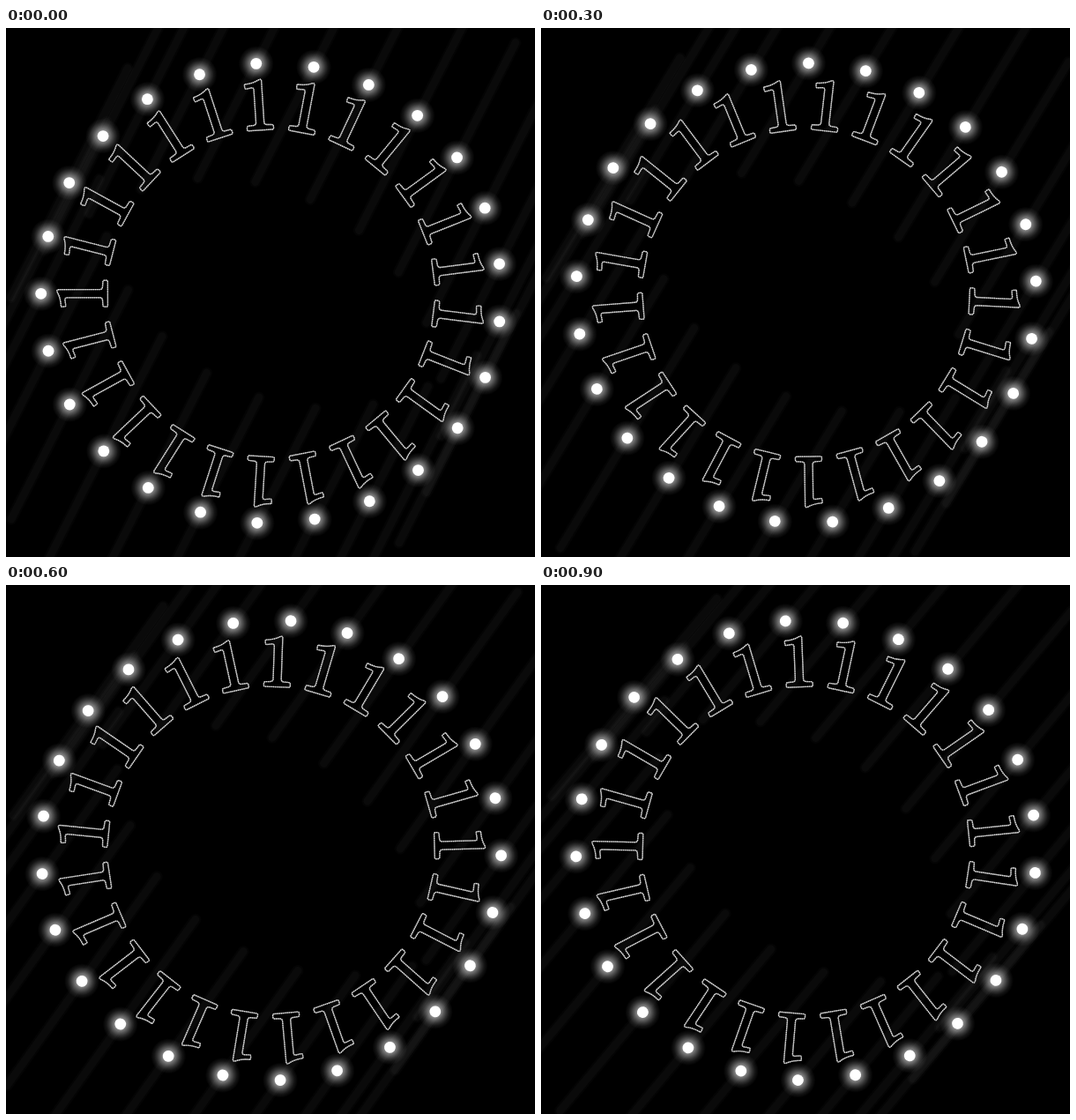
Write an HTML page that moves like this. It is 600 px wide and 600 px high and loops after 1 s.

```html
<!DOCTYPE html>
<html lang="en">
<head>
<meta charset="utf-8">
<title>Ring of ones</title>
<style>
  html, body { margin: 0; width: 100%; height: 100%; overflow: hidden; background: #000; }
  svg { display: block; width: 100vw; height: 100vh; }
</style>
</head>
<body>
<svg viewBox="0 0 600 600">
  <defs>
    <radialGradient id="glow">
      <stop offset="0" stop-color="#fff" stop-opacity=".6"/>
      <stop offset=".33" stop-color="#fff" stop-opacity=".5"/>
      <stop offset=".5" stop-color="#fff" stop-opacity=".33"/>
      <stop offset=".65" stop-color="#fff" stop-opacity=".19"/>
      <stop offset=".8" stop-color="#fff" stop-opacity=".08"/>
      <stop offset="1" stop-color="#fff" stop-opacity="0"/>
    </radialGradient>
    <g id="streak" stroke="#fff" stroke-linecap="round">
      <path d="M0-146V146" stroke-width="13" stroke-opacity=".014"/>
      <path d="M0-146V146" stroke-width="9" stroke-opacity=".022"/>
    </g>
    <g id="dot">
      <circle r="20" fill="url(#glow)"/>
      <circle r="6.4" fill="#fff"/>
    </g>
    <path id="outline" d="M-14-24.5Q-5-25 1.5-28.6Q4.6-30 4.6-27V19.5Q4.6 22.3 7.5 22.6L13.5 23Q15 23.2 15 25V27Q15 28.5 13.5 28.5H-13.5Q-15 28.5-15 27V25Q-15 23.2-13.5 23L-7.5 22.6Q-4.6 22.3-4.6 19.5V-17.5Q-4.6-20.2-7.2-20L-13-19.2Q-14.5-19-14.7-20.5L-15-23Q-15-24.4-14-24.5Z"/>
    <g id="one" fill="none" stroke-linejoin="round">
      <use href="#outline" stroke="#858585" stroke-width="1.4"/>
      <use href="#outline" stroke="#e4e4e4" stroke-width="1.3" stroke-dasharray="1.2 1"/>
    </g>
  </defs>
  <rect width="600" height="600" fill="#000"/>
  <g transform="translate(300.7 300.8)">
    <g id="dots"></g>
    <g id="ones"></g>
  </g>
</svg>
<script>
  const COUNT = 25, GAP = 360 / COUNT, START = -3.72;
  const STEPS = 10, STEP_MS = 100, TILT = 27;
  const dots = document.getElementById('dots');
  const ones = document.getElementById('ones');

  // Places a copy on the ring, turned by `spin` relative to the ring itself.
  function place(ring, id, radius, angle, spin) {
    const use = document.createElementNS('http://www.w3.org/2000/svg', 'use');
    use.setAttribute('href', '#' + id);
    use.setAttribute('transform', `rotate(${angle}) translate(0 ${-radius}) rotate(${spin - angle})`);
    ring.append(use);
  }

  const angles = Array.from({ length: COUNT }, (_, i) => START + i * GAP);
  angles.forEach(a => place(dots, 'streak', 261, a, TILT));
  angles.forEach(a => place(dots, 'dot', 261, a, 0));
  angles.forEach(a => place(ones, 'one', 213.8, a, a));

  // The rings turn in opposite directions, one gap per loop.
  function draw(time) {
    const turn = Math.floor(time / STEP_MS) % STEPS * GAP / STEPS;
    dots.setAttribute('transform', `rotate(${turn})`);
    ones.setAttribute('transform', `rotate(${-turn})`);
  }

  let begin;
  function tick(now) {
    begin ??= now;
    draw(now - begin);
    requestAnimationFrame(tick);
  }
  draw(0);
  requestAnimationFrame(tick);
</script>
</body>
</html>
```
